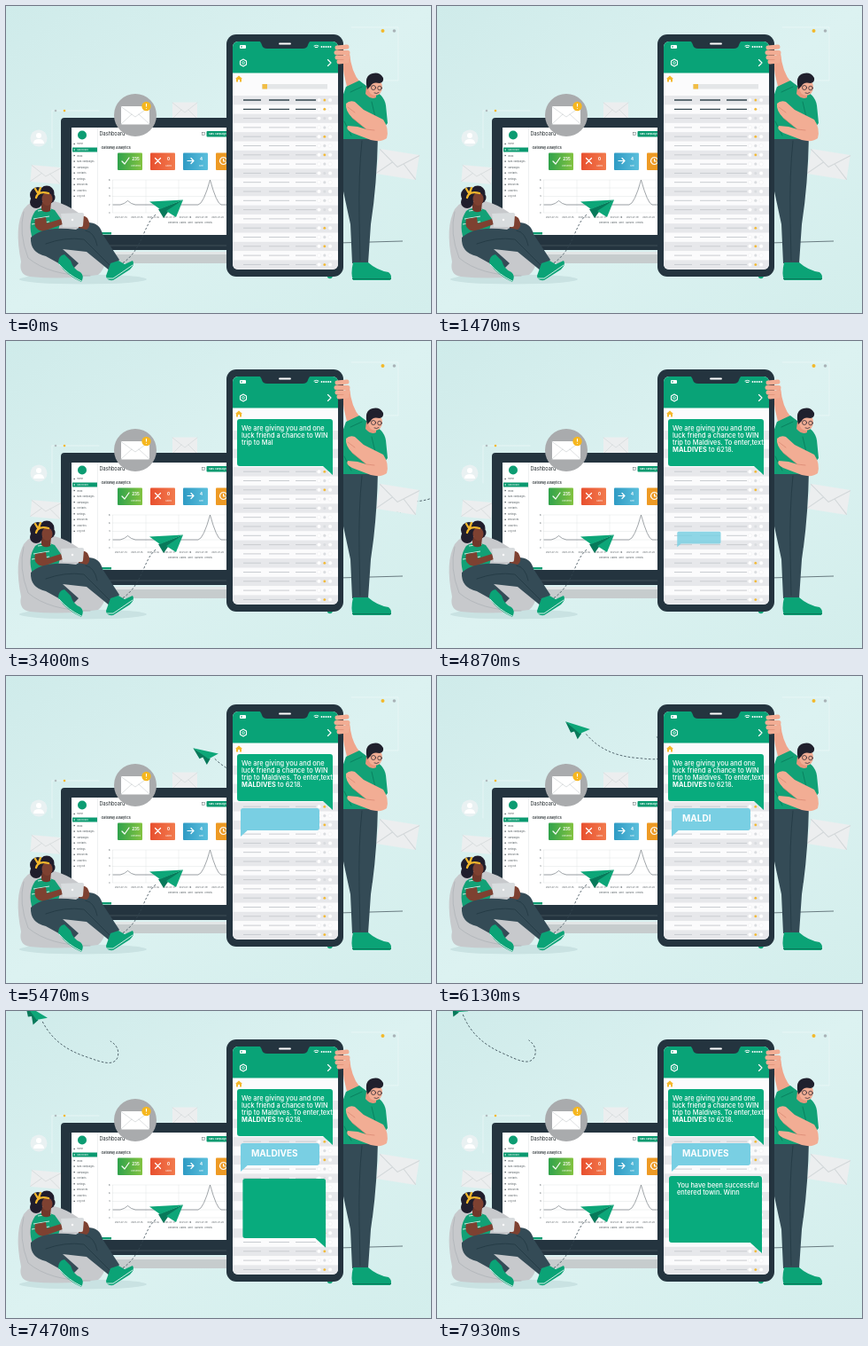
An HTML page that plays this animation: 480 by 346 pixels, repeating every 8000 ms.

```html
<!DOCTYPE html>
<html lang="en">
<head>
<meta charset="utf-8">
<title>Text to win</title>
<style>
html, body { margin: 0; width: 100%; height: 100%; overflow: hidden; background: #d8f0ef; }
svg { display: block; width: 100vw; height: 100vh; font-family: Inter, "Open Sans", sans-serif; }
.message { font-size: 7.4px; font-weight: 500; fill: #fff; white-space: pre; }
.bold { font-weight: 700; }
.tiny { font-size: 2.5px; fill: #4a5358; }
.dash { fill: none; stroke: #33454f; stroke-width: .75; stroke-dasharray: 2.6 2; }
.line { fill: none; stroke-linecap: round; stroke-linejoin: round; }
</style>
</head>
<body>
<svg viewBox="0 0 480 346" preserveAspectRatio="none">
  <defs>
    <linearGradient id="sky" x2="1" y2="1">
      <stop stop-color="#cfebea"/><stop offset=".5" stop-color="#dcf2f1"/><stop offset="1" stop-color="#d3eeec"/>
    </linearGradient>
    <linearGradient id="green"><stop stop-color="#2fa24b"/><stop offset="1" stop-color="#83c341"/></linearGradient>
    <linearGradient id="red"><stop stop-color="#e8502f"/><stop offset="1" stop-color="#f27a4d"/></linearGradient>
    <linearGradient id="blue"><stop stop-color="#2f9bc4"/><stop offset="1" stop-color="#5bbfdc"/></linearGradient>
    <g id="envelope">
      <rect x="-14" y="-9.5" width="28" height="19" rx="1" fill="#eceeef"/>
      <path class="line" d="M-14-9L0 2L14-9M-14 9L-4-1M14 9L4-1" stroke="#d3d8da" stroke-width=".7"/>
    </g>
    <clipPath id="screen"><rect x="256" y="40" width="119" height="257" rx="6"/></clipPath>
  </defs>
  <rect width="480" height="346" fill="url(#sky)"/>

  <g id="flyer">
    <path class="dash" d="M9 6C22 24 40 34 66 38C82 41 96 44 99 33C100 25 96 19 88 16"/>
    <path fill="#08795a" d="M-13-10L-8 3L-4 2L-1 11L4 5Z"/>
    <path fill="#0da678" d="M-13-10L14 1L2 5Z"/>
  </g>

  <!-- floating decorations -->
  <path class="line" d="M390 24H443V84H424M52 118H105M52 118V160" stroke="#eaf6f6" stroke-width=".8"/>
  <circle cx="425.500" cy="28" r="2" fill="#f3b92a"/><circle cx="438.500" cy="28" r="1.800" fill="#a9b3b7"/>
  <circle cx="66" cy="118" r="1.300" fill="#f3b92a"/><circle cx="56" cy="118" r="1.300" fill="#b3bdc0"/>
  <circle cx="37" cy="149" r="9.500" fill="#e9f1f2"/><circle cx="37" cy="146" r="3" fill="#fff"/>
  <path d="M31 155Q31 150 37 150T43 155Z" fill="#fff"/>
  <use href="#envelope" transform="translate(202 118)"/>
  <use href="#envelope" transform="translate(45 190) rotate(5) scale(1.2 1)"/>
  <use href="#envelope" transform="translate(442.500 178.500) rotate(9) scale(1.6 1.5)"/>
  <path d="M375 267L448 265" stroke="#3a4a52" stroke-width=".7"/>

  <!-- laptop -->
  <path d="M105 277H256V290H112Q105 288 105 277Z" fill="#c6cccd"/>
  <path d="M105 277H256V280H105Z" fill="#e2e6e6"/>
  <path d="M66 126H256V275H108V268H66Q62 268 62 264V130Q62 126 66 126Z" fill="#24343f"/>
  <path d="M80 270H256" stroke="#51616a" stroke-width=".6"/>
  <rect x="74" y="137" width="182" height="121" fill="#fff"/>
  <path d="M103.500 137V258" stroke="#e3e6e7" stroke-width=".6"/>
  <circle cx="86" cy="145.500" r="5" fill="#0c9c72"/>
  <rect x="75" y="159.500" width="28" height="5" fill="#0a9a70"/>
  <g id="menu" class="tiny"></g>
  <text x="105.500" y="146.200" font-size="5.600" fill="#20282c">Dashboard</text>
  <rect x="221.500" y="142.500" width="3" height="3" fill="none" stroke="#5c686d" stroke-width=".5"/>
  <rect x="226.500" y="141" width="29" height="6.500" rx="1" fill="#0a9a70"/>
  <text x="229" y="145.300" font-size="2.700" font-weight="600" fill="#fff">SMS Campaign</text>
  <text x="107.500" y="161" font-size="3.700" font-weight="600" fill="#2d3538">Gateway Analytics</text>
  <g id="cards"></g>
  <g stroke="#d9dddf" stroke-width=".4"><path d="M120 196H252M120 205H252M120 214.500H252M120 224H252M120 233H252M120.500 196V233M158 196V233M195 196V233"/></g>
  <path class="line" d="M121 224H129Q134 223 137.500 219.500Q141 223 146 224H217Q223 223 230.500 196Q238 223 243 224H250" stroke="#777f84" stroke-width=".7"/>
  <g id="axis" class="tiny"></g>
  <rect x="107" y="255" width="12" height="2.500" fill="#0a9a70"/>
  <text class="tiny" x="183" y="245">Delivered · Failed · Sent · Queued · Credits</text>

  <!-- alert badge -->
  <circle cx="146" cy="123" r="24" fill="#a9abad"/>
  <rect x="130" y="113" width="32" height="20.500" rx="1" fill="#fff"/>
  <path class="line" d="M130 113.500L146 125L162 113.500M130 133L142 122M162 133L150 122" stroke="#d5d8da" stroke-width=".8"/>
  <circle cx="158.500" cy="113" r="5.200" fill="#f6b71f"/>
  <path d="M158.500 110V113.500M158.500 115.200V116" stroke="#fff" stroke-width="1.100"/>

  <!-- large paper plane -->
  <path class="dash" d="M169 235C154 248 155 275 130 291"/>
  <path fill="#08795a" d="M200 218.500L172 229L178 239L183 232Z"/>
  <path fill="#0da678" d="M200 218.500L162 220.500L174 229ZM200 218.500L181 231L192 238Z"/>

  <!-- woman on a bean bag -->
  <ellipse cx="87" cy="308" rx="72" ry="5.500" fill="#c9e2e2"/>
  <path d="M20 229Q28 216 51 219Q88 228 109 263Q118 292 104 303Q66 309 27 305Q14 303 17 288Q9 249 20 229Z" fill="#c7c9cc"/>
  <path d="M20 232Q14 256 25 284Q49 304 95 304" class="line" stroke="#b4b8bc"/>
  <path d="M33 231Q43 224 55 230L62 240L58 258L30 263Q24 244 33 231Z" fill="#12a176"/>
  <path d="M31 240L49 237M29 246L49 243M36 231L51 229" stroke="#dff3ec" stroke-width=".9"/>
  <path d="M40 221H51L50 231Q44 234 40 230Z" fill="#70382b"/>
  <g fill="#201d2c"><circle cx="36" cy="213" r="9"/><circle cx="46" cy="211" r="8.500"/><circle cx="34" cy="221" r="7"/><circle cx="49" cy="216" r="6.500"/></g>
  <ellipse cx="46.500" cy="217.500" rx="6" ry="7.500" fill="#7e4131"/>
  <path class="line" d="M34 216Q36 208 48 211M36 211L33 206M37 210L39 205" stroke="#f4b82c" stroke-width="2.300"/>
  <path d="M33 240Q30 252 42 254L64 246L62 240L46 245L45 238Z" fill="#7e4131"/>
  <path d="M28 261Q43 247 79 252L92 244Q106 244 109 257L128 286L118 299L91 277L64 274L82 290L74 298L45 282Q27 278 28 261Z" fill="#344b56"/>
  <path class="line" d="M45 268Q67 260 88 263L121 296M90 253Q100 255 103 270" stroke="#233943" stroke-width=".8"/>
  <path d="M82 239Q87 234 92 239Q97 248 91 252L82 250Z" fill="#7e4131"/>
  <path d="M62 234L86 233Q88 233 88 235L87 247Q87 249 85 249L64 249Z" fill="#d8dcde"/><circle cx="75" cy="241" r="1.200" fill="#fff"/>
  <path d="M66 280L73 287Q76 297 84 300Q89 304 85 311Q69 304 59 290Q59 281 66 280Z" fill="#0ba376"/>
  <path d="M118 290L127 287L134 291L143 287Q146 291 140 297L121 309Q113 310 113 304Z" fill="#0ba376"/>
  <path class="line" d="M60 291Q70 303 85 310M114 307L121 307L143 292" stroke="#e9f5f2" stroke-width=".9"/>

  <!-- man behind the phone -->
  <path d="M364 296H369V305Q367 309 363 306Z" fill="#0ba376"/>
  <path d="M378 146H420Q419 201 412 246L409 290H391L389 246L378 195Z" fill="#344b56"/>
  <path class="line" d="M402 152Q398 190 399 240L400 287" stroke="#233943" stroke-width=".8"/>
  <path d="M392 289H409Q419 298 432 300Q437 304 434 309H392Q389 302 392 289Z" fill="#0ba376"/>
  <path d="M391 307.500H435" stroke="#07795a"/>
  <path d="M379 58L388 53Q390 75 400 86L386 95Q381 77 379 58Z" fill="#efa58c"/>
  <path d="M384 91L399 84L411 93Q427 99 429 112L431 132L416 150H379V105Z" fill="#12a176"/>
  <path class="line" d="M389 97L402 91M413 108L417 125M382 130L390 146" stroke="#08795a" stroke-width=".8"/>
  <path d="M407 91L418 94L418 103Q412 106 406 99Z" fill="#e9967d"/>
  <ellipse cx="417" cy="91.500" rx="8" ry="9.500" fill="#f2ad94"/>
  <path d="M408 94Q404 78 414 76Q422 74 426 81Q427 86 422 87Q414 85 412 90Z" fill="#20202d"/>
  <g class="line" stroke="#20202d" stroke-width=".7"><circle cx="415" cy="92" r="2.500"/><circle cx="422" cy="92.500" r="2.300"/><path d="M416 98Q419 99.500 421 97.500"/></g>

  <!-- phone -->
  <rect x="249" y="32" width="132" height="273" rx="11" fill="#24343f"/>
  <g clip-path="url(#screen)">
    <rect x="256" y="40" width="119" height="257" fill="#fbfbfc"/>
    <rect x="256" y="40" width="119" height="35.500" fill="#09a377"/>
    <g id="rows"></g>
  </g>
  <path d="M284 38H346Q342 40 341 44Q340 48 335 48H295Q290 48 289 44Q288 40 284 38Z" fill="#24343f"/>
  <path class="line" d="M309 42.500H321" stroke="#fff" stroke-width="1.800"/>
  <rect x="264" y="44" width="7" height="4" rx="1" fill="#fff"/><path d="M266 45V47" stroke="#09a377"/>
  <path class="line" d="M348 45Q350.500 43.500 353 45M349.200 46.500H351.800" stroke="#fff"/>
  <path class="line" d="M356.500 46H367" stroke="#fff" stroke-width="1.900" stroke-dasharray="0 2.500"/>
  <path class="line" d="M268 60L271.500 62V66L268 68L264.500 66V62ZM363.500 60.500L367 64L363.500 67.500" stroke="#fff" stroke-width="1.100"/>
  <circle cx="268" cy="64" r="1.400" fill="none" stroke="#fff" stroke-width=".7"/>
  <path d="M259 82L263 78.500L267 82H266V85.500H264V83H262V85.500H260V82Z" fill="#f4b82c"/>
  <rect x="289" y="88" width="74" height="5.500" fill="#e4e6e8"/><rect x="289.500" y="88" width="5.500" height="5.500" fill="#f1bd45"/>

  <g id="bubbles"></g>
  <g id="messages"></g>

  <!-- hands in front -->
  <path class="line" d="M374 47L385 46M373 52.500H386M374 58H386M376 63L385 62" stroke="#f2ad94" stroke-width="5"/>
  <path class="line" d="M373 50H381M373 55.300H381M374 60.600H381" stroke="#d98670" stroke-width=".6"/>
  <path d="M384 110Q388 106 394 108L404 117L426 128Q433 138 430 149Q424 154 412 151L391 143Q383 139 386 135L397 136L407 139L391 126Q383 118 384 110Z" fill="#f2ad94"/>
  <path class="line" d="M391 126L407 139L416 140M386 114L394 120" stroke="#d98670" stroke-width=".7"/>
</svg>
<script>
const NS = 'http://www.w3.org/2000/svg';
const LOOP = 8000;
const $ = id => document.getElementById(id);
const clamp = v => Math.max(0, Math.min(1, v));
const mix = (a, b, p) => a + (b - a) * p;

function add(parent, tag, attrs, text = '') {
  const node = document.createElementNS(NS, tag);
  for (const name in attrs) node.setAttribute(name, attrs[name]);
  node.textContent = text;
  return parent.appendChild(node);
}

['Home', 'Dashboard', 'Inbox', 'SMS Campaigns', 'Campaigns', 'Contacts', 'Settings', 'Resources', 'Analytics', 'Log Out']
  .forEach((label, i) => {
    const y = 156.4 + i * 6.55, fill = i === 1 ? '#fff' : '#4a5358';
    add($('menu'), 'rect', { x: 76.5, y: y - 1.6, width: 1.3, height: 1.3, fill });
    add($('menu'), 'text', { x: 80, y, fill, style: `fill:${fill}` }, label);
  });

[['url(#green)', 'M131 175l3 3l5-7', 235, 'Delivered'], ['url(#red)', 'M131.500 171.500l6 6m0-6l-6 6', 0, 'Failed'],
 ['url(#blue)', 'M131 174.500h7m-3-3l3 3l-3 3', 4, 'Sent'], ['#ee9a24', 'M134.500 170.500a4 4 0 1 0 .1 0m0 2v2.500h2', 0, 'Credits']]
  .forEach(([fill, icon, count, label], i) => {
    const card = add($('cards'), 'g', { transform: `translate(${i * 37})` });
    add(card, 'rect', { x: 126, y: 165.5, width: 28, height: 19.5, rx: 1, fill });
    add(card, 'path', { d: icon, class: 'line', stroke: '#fff', 'stroke-width': 1.2 });
    add(card, 'text', { x: 146.5, y: 173.5, 'font-size': 4.5, 'font-weight': 700, fill: '#fff', 'text-anchor': 'middle' }, count);
    add(card, 'text', { x: 146.5, y: 181, 'font-size': 2.4, fill: '#fff', 'text-anchor': 'middle' }, label);
  });

for (let i = 0; i < 7; i++) add($('axis'), 'text', { x: 123 + i * 18.2, y: 238.5 }, `2021-07-${14 + i}`);
for (let i = 0; i < 5; i++) add($('axis'), 'text', { x: 116, y: 197 + i * 9.2 }, 8 - i * 2);

const starred = [0, 1, 4, 6, 14, 16, 18];
for (let i = 0; i < 19; i++) {
  const y = 106 + i * 10.3, rows = $('rows');
  if (i % 2 === 0) add(rows, 'rect', { x: 256, y: y - 5, width: 119, height: 10.3, fill: '#e7e8eb' });
  add(rows, 'path', {
    d: `M268 ${y}H288M297 ${y}H320M327 ${y}H350`,
    stroke: i < 2 ? '#35474f' : '#c9ccd0', 'stroke-width': i < 2 ? 1.3 : 1
  });
  ['#fff', starred.includes(i) ? '#f4b82c' : '#d9dcdf', '#fff'].forEach((fill, k) =>
    add(rows, 'circle', { cx: 353.5 + k * 6.3, cy: y, r: k === 1 ? 1.5 : 2.2, fill, stroke: '#dfe1e4', 'stroke-width': .3 }));
}

// Bubble outline centred on the origin; side is 1 for a right tail, -1 for a left one.
function bubblePath(w, h, tail, side) {
  const x = side * w / 2, top = -h / 2, base = h / 2 - tail, r = 3 * side;
  return `M${-x + r} ${top}H${x - r}Q${x} ${top} ${x} ${top + 3}V${h / 2}L${x - side * tail * 1.1} ${base}` +
    `H${-x + r}Q${-x} ${base} ${-x} ${base - 3}V${top + 3}Q${-x} ${top} ${-x + r} ${top}Z`;
}

const bubbles = [
  { start: 930, end: 2040, from: [284, 300], to: [315, 119.5], size: [108, 63, 10, 1], fill: '#08ab7d' },
  { start: 4240, end: 5380, from: [279, 296], to: [309.5, 165], size: [89, 32, 7, -1], fill: '#79cfe3' },
  { start: 6900, end: 7540, from: [312, 214], to: [314.5, 229.5], size: [105, 87, 12, 1], fill: '#08ab7d' }
].map(b => ({ ...b, node: add($('bubbles'), 'path', { d: bubblePath(...b.size), fill: b.fill }) }));

function message(x, y, lines, start, end, attrs = {}) {
  const spans = [];
  lines.forEach((line, i) => {
    const text = add($('messages'), 'text', { class: 'message', x, y: y + i * 8.1, ...attrs });
    [].concat(line).forEach((part, k, parts) => {
      const bold = parts.length > 1 && k === 0;
      spans.push({ part, node: add(text, 'tspan', bold ? { class: 'bold' } : {}) });
    });
  });
  return { spans, start, end, length: spans.reduce((n, s) => n + s.part.length, 0) };
}

const messages = [
  message(266, 101, ['We are giving you and one', 'luck friend a chance to WIN',
    'trip to Maldives. To enter,text', ['MALDIVES', ' to 6218.']], 2270, 4050),
  message(277, 164, ['MALDIVES'], 5650, 6400, { style: 'font-size:10px;font-weight:700' }),
  message(271, 198.5, ['You have been successful', 'entered towin. Winn'], 7480, 7920)
];

// time, x, y, rotation
const flight = [
  [3100, 499, 176, -62], [3400, 448, 185, -55], [4400, 338, 139, -30], [5470, 226, 89, -10],
  [6730, 98, 34, 0], [7400, 35, 6, 8], [7930, 22, -4, 14], [LOOP, 20, -6, 14]
];

function drawFlyer(t) {
  const next = flight.findIndex(key => key[0] > t);
  $('flyer').style.display = next > 0 ? '' : 'none';
  if (next < 1) return;
  const a = flight[next - 1], b = flight[next], p = (t - a[0]) / (b[0] - a[0]);
  const [, x, y, turn] = a.map((v, i) => mix(v, b[i], p));
  $('flyer').setAttribute('transform', `translate(${x} ${y}) rotate(${turn})`);
}

function draw(now) {
  const t = now % LOOP;
  for (const b of bubbles) {
    const p = clamp((t - b.start) / (b.end - b.start));
    const [x, y] = b.from.map((v, i) => mix(v, b.to[i], p));
    b.node.setAttribute('transform', `translate(${x} ${y}) scale(${p})`);
    b.node.setAttribute('opacity', clamp(p * 1.5));
  }
  for (const m of messages) {
    let left = Math.floor(clamp((t - m.start) / (m.end - m.start)) * m.length);
    for (const { part, node } of m.spans) {
      node.textContent = part.slice(0, Math.max(0, left));
      left -= part.length;
    }
  }
  drawFlyer(t);
  requestAnimationFrame(draw);
}
requestAnimationFrame(draw);
</script>
</body>
</html>
```
